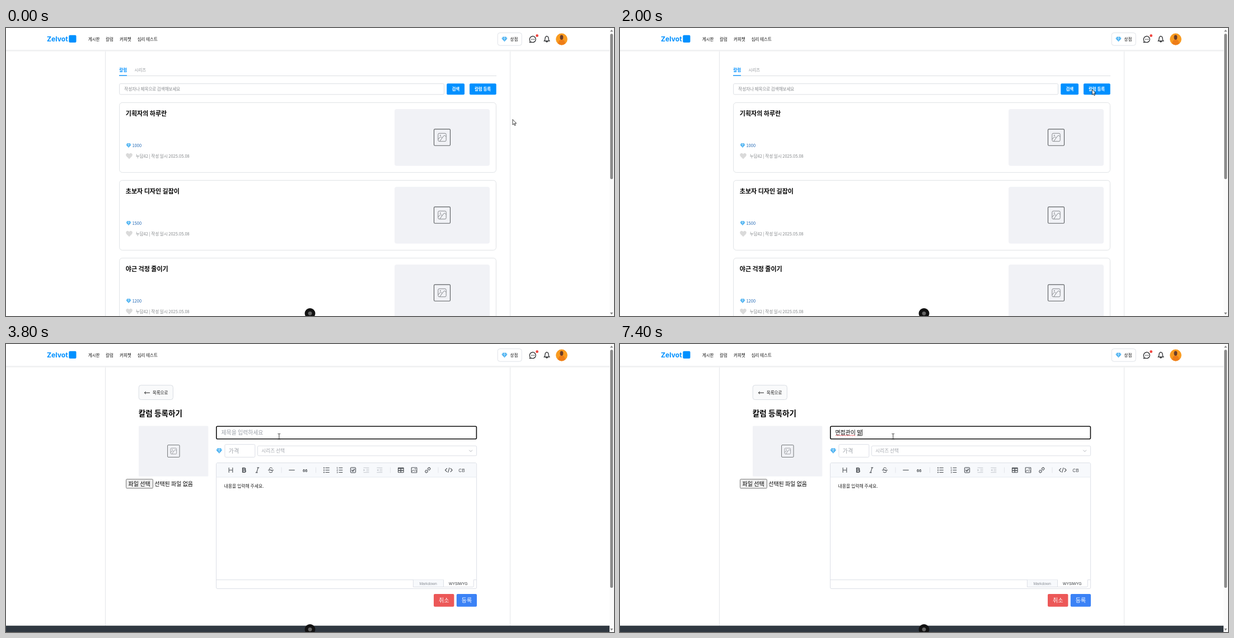
An HTML page that plays this animation: 1086 px wide and 515 px high, repeating every 8000 ms.

```html
<!DOCTYPE html>
<html>
<head>
<meta charset="utf-8">
<title>칼럼 등록</title>
<style>
  html, body { margin: 0; width: 100%; height: 100%; overflow: hidden; background: #fff; }
  svg { display: block; width: 1086px; height: 515px; }
  text { font-family: "Noto Sans CJK KR", "Noto Sans KR", "Noto Sans", sans-serif; white-space: pre; }
  .latin { font-family: "Liberation Sans", Arial, sans-serif; }
  .brand { font-family: Inter, sans-serif; }
</style>
</head>
<body>
<svg id="stage" viewBox="0 0 1086 515" xmlns="http://www.w3.org/2000/svg"></svg>
<script>
const BLUE = '#0090ff', EDGE = '#dcdfe6', PALE = '#f1f2f6';

// Text is placed by its left edge and the vertical middle of its glyphs.
const label = (x, y, size, words, fill = '#000', weight = 400, extra = '') =>
  `<text x="${x}" y="${y + size * .38}" font-size="${size}" fill="${fill}" font-weight="${weight}" ${extra}>${words}</text>`;
const box = (x, y, right, bottom, r, fill, stroke = 'none', width = 1) =>
  `<rect x="${x}" y="${y}" width="${right - x}" height="${bottom - y}" rx="${r}" fill="${fill}" stroke="${stroke}" stroke-width="${width}"/>`;
const line = (d, stroke, width = 1, fill = 'none') =>
  `<path d="${d}" stroke="${stroke}" stroke-width="${width}" fill="${fill}"/>`;
const shape = (d, fill) => `<path d="${d}" fill="${fill}"/>`;
const at = (x, y, content, scale = 1) =>
  `<g transform="translate(${x} ${y}) scale(${scale})">${content}</g>`;
const group = (id, content) => `<g id="${id}">${content}</g>`;

const gem = shape('M-5-1.2-3-4.2H3L5-1.2 0 4.6Z', '#3fa9ee')
  + shape('M-5-1.2-3-4.2-1.8-1.2ZM1.8-1.2 3-4.2 5-1.2ZM-1.8-1.2H1.8L0 4.6Z', '#82cdf8')
  + shape('M-1.8-1.2 0-4.2 1.8-1.2Z', '#b5e2fb');

const picture = box(-14.5, -14.7, 14.5, 14.7, 1.8, 'none', '#5d6063', 1.15)
  + box(-7.2, -7.2, 7.2, 7.2, 2.2, 'none', '#85888c', 1)
  + line('M-7 3.5-3.5-.5Q-2.5-1.5-1.5-.5L0 1 3.2-3Q4.2-4 5.2-3L7-1M-4 6.8 0 1', '#85888c')
  + '<circle cx="-3.2" cy="-3.6" r="1" fill="#85888c"/>';

function header() {
  const nav = [[146.7, '게시판'], [178, '칼럼'], [203, '커피챗'], [234.7, '심리 테스트']];
  return '<rect width="1078" height="40" fill="#fff"/>'
    + '<rect y="39.5" width="1078" height="1" fill="#e2e3e5"/><rect y="40.5" width="1078" height="1.5" fill="#f4f4f5"/>'
    + label(73, 19.8, 12.2, 'Zelvot', BLUE, 700, 'class="brand"')
    + box(112.3, 12.8, 125.5, 26, 2, BLUE)
    + nav.map(([x, words]) => label(x, 20, 7.5, words, '#111', 500)).join('')
    + box(878.2, 8.6, 921.2, 31.2, 4, '#fff', '#dfe3e8')
    + at(890.4, 20, gem) + label(900.5, 20.3, 7.5, '상점', '#111', 500)
    + line('M936 24.8 935.6 25.6 938.2 25.1A5.5 5.5 0 1 0 936 23Z', '#16181b', 1.2)
    + [938.6, 941, 943.4].map(x => `<circle cx="${x}" cy="20.2" r=".75" fill="#16181b"/>`).join('')
    + '<circle cx="948.6" cy="13.7" r="2.4" fill="#f0443e"/>'
    + line('M961.4 23.2Q963 21.5 963 18.6A3 3.6 0 0 1 969 18.6Q969 21.5 970.6 23.2ZM966 15V13.8M964.4 23.6Q966 26.6 967.6 23.6', '#16181b', 1.2)
    + '<circle cx="992.5" cy="20" r="10.4" fill="#f99b20"/>'
    + shape('M986 28.1Q987 20.5 992.5 20.5T999 28.1A10.4 10.4 0 0 1 986 28.1Z', '#ee7d18')
    + '<ellipse cx="992.4" cy="16.8" rx="2.9" ry="4.2" fill="#6b3d28"/>';
}

function card([title, price], i) {
  return `<g transform="translate(0 ${i * 139})">`
    + box(202.7, 133.4, 875.4, 258.3, 5, '#fff', '#dfe2e5')
    + label(213.8, 153, 11, title, '#000', 700)
    + at(219, 210, gem, .88) + label(225.4, 209.8, 7.5, price, '#2369b5')
    + shape('M220 234.3 215.2 229.5Q213 226.5 215.4 224.5 218.2 222.8 220 225.6 221.8 222.8 224.6 224.5 227 226.5 224.8 229.5Z', '#dadada')
    + label(231.8, 229, 7.5, '누담42 | 작성 일시 2025.05.08', '#85888b')
    + box(694, 145, 864, 246.5, 4, PALE) + at(779, 195.5, picture) + '</g>';
}

function listPage() {
  const cards = [['기획자의 하루란', 1000], ['초보자 디자인 길잡이', 1500], ['야근 걱정 줄이기', 1200]];
  return label(202.3, 74.7, 7.5, '칼럼', BLUE, 700) + label(229.5, 74.7, 7.5, '시리즈', '#92969b')
    + line('M202 85.5H876', '#dcdfe3') + line('M202 84.9H216', BLUE, 1.3)
    + box(202.7, 99.6, 782.5, 118.9, 2, '#fff', '#dcdfe3')
    + label(211.3, 109.3, 7.5, '작성자나 제목으로 검색해보세요', '#85888c')
    + box(787.2, 99.3, 819, 119.2, 2, BLUE) + label(796.4, 109.5, 7.5, '검색', '#fff', 700)
    + box(828, 99.3, 875.7, 119.2, 2, BLUE) + label(836.9, 109.5, 7.5, '칼럼 등록', '#fff', 700)
    + cards.map(card).join('');
}

function toolbar() {
  const ink = '#4b4f54', faint = '#c3c7cd';
  const rows = [-4, 0, 4];
  const indent = dir => line('M-5-4.2H5M0-1.4H5M0 1.4H5M-5 4.2H5', faint)
    + shape(`M${-3.5 - 1.5 * dir}-2V2L${-3.5 + 1.5 * dir} 0Z`, faint);
  const icons = [
    [401.5, line('M-3.3-4.5V4.5M3.3-4.5V4.5M-3.3 0H3.3', ink, 1.1)],
    [425, line('M-2.3-3.7H.5Q2.6-3.7 2.6-1.9T.5-.1H-2.3ZM-2.3-.1H1Q3-.1 3 1.8T1 3.7H-2.3Z', ink, 1.7)],
    [449, line('M-.5-4.4H3.2M-3.2 4.4H.5M1.4-4.4-1.4 4.4', ink, 1.1)],
    [473, line('M3-2.5Q2.2-4.4 0-4.4T-2.8-2.3Q-2.8-.6 0 0T2.9 2.2Q2.9 4.4 0 4.4T-3.1 2.4M-5 0H5', ink, 1)],
    [510.5, line('M-5.2 0H5.2', ink, 1.1)],
    [534.3, label(-4.3, .2, 7.5, '66', ink, 700, 'class="latin"')],
    [572.4, rows.map(y => line(`M-2 ${y}H5.3`, ink, 1.1) + box(-5.3, y - 1, -3.5, y + 1, .4, ink)).join('')],
    [596, rows.map((y, i) => line(`M-1.5 ${y}H5.3`, ink, 1.1) + label(-5.5, y, 4.2, i + 1, ink, 700, 'class="latin"')).join('')],
    [620, box(-4.6, -4.6, 4.6, 4.6, 1, '#dfe2e7', ink, 1) + line('M-2.5 0-.6 2 2.8-2', ink, 1.2)],
    [643.5, indent(1)],
    [667.3, indent(-1)],
    [705.3, box(-4.8, -4.3, 4.8, 4.3, .5, 'none', ink, 1.1) + line('M-4.8-3H4.8M-4.8 .8H4.8M0-3V4.3', ink, 1.4)],
    [729, box(-4.8, -4.5, 4.8, 4.5, .5, 'none', ink, 1.1) + line('M-4.5 3-1.5-.5 1 2 2.5.5 4.5 2.5', ink) + '<circle cx="2" cy="-2" r="1" fill="#4b4f54"/>'],
    [753.3, `<g transform="rotate(-45)">${line('M-1-2H-3.6A2 2 0 0 0-3.6 2H-1M1-2H3.6A2 2 0 0 1 3.6 2H1M-2.5 0H2.5', ink, 1.1)}</g>`],
    [790.8, line('M-3-3.3-6.3 0-3 3.3M3-3.3 6.3 0 3 3.3M1.3-4.4-1.3 4.4', ink, 1.1)],
    [813.8, label(-5.5, .2, 8.2, 'CB', ink, 400, 'class="latin"')]
  ];
  return icons.map(([x, icon]) => at(x, 225.5, icon)).join('')
    + [492, 553.5, 686.5, 772].map(x => line(`M${x} 220.5V230.5`, '#e2e4e9')).join('');
}

function formPage() {
  return box(237.2, 73.7, 298.4, 99.5, 4, '#f9fafb', '#d9dde3')
    + line('M257 87.2H247.5M249.8 85 247.3 87.2 249.8 89.4', '#222')
    + label(261.8, 87.2, 7.5, '목록으로', '#111', 500)
    + label(236.8, 123.8, 13.6, '칼럼 등록하기', '#000', 700)
    + box(237, 146.5, 361.3, 236.8, 1.5, PALE) + at(299.3, 191.5, picture, .74)
    + box(214.6, 241.8, 262.4, 258, 1.5, '#efefef', '#767676') + label(218.6, 250, 10, '파일 선택')
    + label(265.2, 250, 10, '선택된 파일 없음')
    + group('titleBox', box(375.5, 147, 840.6, 170, 2, '#fff', EDGE))
    + group('focusBox', box(375.8, 147.2, 840.4, 169.8, 2, '#fff', '#101010', 1.6))
    + at(380.8, 191, gem, 1.05)
    + box(390.9, 179.6, 444.8, 202.4, 2, '#fff', EDGE) + label(397.8, 191, 9.9, '가격', '#9ba0a8')
    + box(449.5, 182.2, 840.6, 199.8, 2, '#fff', EDGE) + label(456.2, 191.1, 8.7, '시리즈 선택', '#a3a7ae')
    + line('M827.4 189.7 830.2 192.5 833 189.7', '#a3a7ae', .9)
    + box(375.5, 212.5, 840.6, 437.5, 2.5, '#fff', EDGE)
    + shape('M376 238V215Q376 213 378 213H838Q840.1 213 840.1 215V238Z', '#f7f9fc') + line('M375.5 238H840.6', '#e6e9ee')
    + toolbar()
    + label(389.5, 253.7, 7.9, '내용을 입력해 주세요.', '#222')
    + line('M375.5 421.7H781.5M835.3 421.7H840.6', EDGE)
    + line('M727.4 421.7V434.6H781.5V421.7', EDGE, 1, '#f7f9fc') + line('M781.5 434.6H833.3Q835.3 434.6 835.3 432.6V421.7', EDGE)
    + label(738.4, 428.7, 6.8, 'Markdown', '#8d9299', 400, 'class="latin"')
    + label(791, 428.7, 6.8, 'WYSIWYG', '#33373b', 400, 'class="latin"')
    + box(764, 447, 800.4, 469.8, 2, '#ec5858') + label(773.1, 458.4, 9.9, '취소', '#fff')
    + box(804.8, 447, 841, 469.8, 2, '#3b82f6') + label(813.8, 458.4, 9.9, '등록', '#fff')
    + '<rect y="503.7" width="1078" height="12" fill="#303841"/>'
    + group('editorCaret', line('M389.6 248.5V259', '#000', .8))
    + label(384.5, 158.4, 9.9, '', '#000', 400, 'id="typed"')
    + '<path id="spelling" stroke="#e5333a" stroke-width=".8" fill="none"/>'
    + '<path id="composing" stroke="#222" stroke-width=".8"/><path id="caret" stroke="#000" stroke-width=".8"/>';
}

document.getElementById('stage').innerHTML =
  line('M177.5 40V515M900.5 40V515', '#e4e6e9')
  + group('list', listPage()) + group('form', formPage()) + header()
  + '<circle cx="543" cy="510.3" r="9.4" fill="#121212"/><circle cx="543" cy="510.3" r="3.4" fill="#666"/>'
  + '<rect x="1078" width="8" height="515" fill="#fbfbfb"/>'
  + shape('M1079 6.6H1084.4L1081.7 3ZM1079 508.8H1084.4L1081.7 512.4Z', '#858585')
  + '<rect id="thumb" x="1079.2" y="10.3" width="5" rx="2.5" fill="#8b8b8b"/>'
  + group('arrow', line('M0 0V9.6L2.2 7.5 3.7 10.9 5.2 10.2 3.7 6.9H6.6Z', '#111', .8, '#fff'))
  + group('beam', line('M-2.2-4.8H-.7L0-4.2.7-4.8H2.2M-2.2 4.8H-.7L0 4.2.7 4.8H2.2M0-4.2V4.2', '#222', .9));

const el = Object.fromEntries([...document.querySelectorAll('[id]')].map(e => [e.id, e]));
const LOOP = 8000, TICK = 1000 / 15, TEXT_X = 384.5, TEXT_SIZE = 9.9;
const PLACEHOLDER = '제목을 입력하세요';

// Pointer stops: tick, x, y
const pointer = [
  [0, 905, 163.5], [2, 905, 163.5], [6, 857, 128], [10, 817, 98], [17, 817, 98],
  [18, 871.5, 94.5], [21, 872, 110], [23, 860, 121], [25, 836, 121], [27, 825, 112], [30, 843.3, 109.8],
  [34, 843.3, 109.8], [35, 624, 184.5], [36, 624, 184.5], [38, 543, 187.5], [39, 543, 187.5],
  [41, 500, 170], [43, 479.5, 163], [50, 479.5, 163], [51, 487.8, 165.3], [120, 487.8, 165.3]
];

// Title field: start time, text, last letter still composing
const typing = [
  [0, '', 0], [3870, 'ㅁ', 1], [4000, '머', 1], [4330, '며', 1], [4530, '', 0], [4730, 'ㅁ', 1],
  [4930, '며', 1], [5000, '면', 1], [5270, '면저', 1], [5400, '면접', 1], [6000, '면접관', 1],
  [6930, '면접관ㅇ', 1], [7000, '면접관이', 1], [7070, '면접관이 ', 0], [7130, '면접관이 ㅁ', 1],
  [7330, '면접관이 마', 1], [7400, '면접관이 말', 1]
];

const show = (e, on) => e.setAttribute('visibility', on ? 'inherit' : 'hidden');
const between = (t, a, b) => t >= a && t < b;
const widthOf = words => [...words].reduce((sum, c) => sum + (c === ' ' ? .224 : .92), 0) * TEXT_SIZE;

function pointerAt(tick) {
  const i = Math.max(1, pointer.findIndex(p => p[0] >= tick));
  const [t0, x0, y0] = pointer[i - 1], [t1, x1, y1] = pointer[i];
  const p = (tick - t0) / (t1 - t0);
  return [x0 + (x1 - x0) * p, y0 + (y1 - y0) * p];
}

function drawTitle(t) {
  const [, words, composing] = typing.findLast(step => t >= step[0]);
  const end = TEXT_X + widthOf(words);
  el.typed.textContent = words || PLACEHOLDER;
  el.typed.setAttribute('fill', words ? '#000' : '#9ba0a8');
  el.composing.setAttribute('d', composing ? `M${end - 8.8} 163.8H${end - .4}` : '');
  const caretOn = words ? !between(t, 6470, 6930) : between(t, 3070, 3800) || between(t, 4530, 4730);
  el.caret.setAttribute('d', caretOn ? `M${end + .2} 152.6V164` : '');
  let wave = '';
  if (t >= 7070) {
    wave = `M${TEXT_X + .5} 164`;
    for (let i = 0; i < 16; i++) wave += `l1.1 ${i % 2 ? 1.1 : -1.1}l1.1 0`;
  }
  el.spelling.setAttribute('d', wave);
}

function draw(t) {
  const onForm = t >= 2066, focused = t >= 3066, tick = Math.floor((t + 1) / TICK);
  show(el.list, !onForm);
  show(el.form, onForm);
  show(el.titleBox, onForm && !focused);
  show(el.focusBox, onForm && focused);
  show(el.editorCaret, onForm && t < 2666);
  el.thumb.setAttribute('height', onForm ? 425.7 : 260);
  if (onForm) drawTitle(t + 4);

  const [x, y] = pointerAt(tick), overField = tick >= 35;
  show(el.arrow, !overField);
  show(el.beam, overField);
  (overField ? el.beam : el.arrow).setAttribute('transform', `translate(${x} ${y})`);
}

const start = performance.now();
function play() {
  draw((performance.now() - start) % LOOP);
  requestAnimationFrame(play);
}
play();
</script>
</body>
</html>
```
